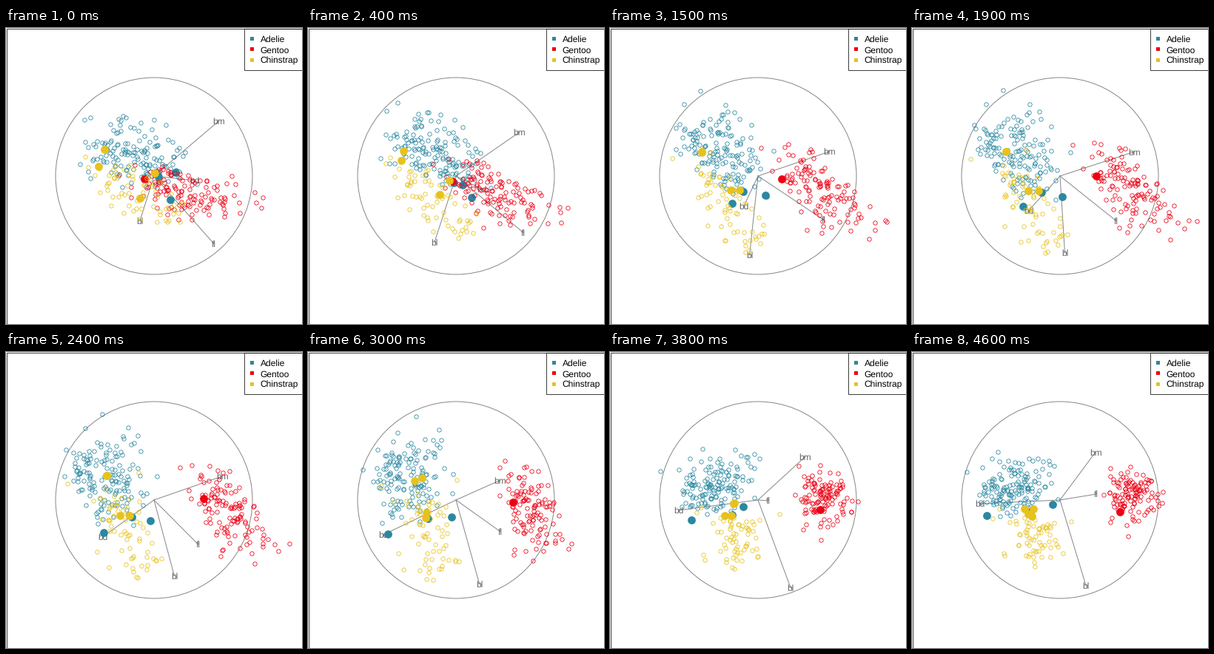
A matplotlib script for the animation above (4.7 s loop, 400 by 400 pixels).

```python
import numpy as np
import matplotlib.pyplot as plt
from matplotlib.animation import FuncAnimation
from matplotlib.patches import Circle, Rectangle

SIZE, FRAMES, STEP = 400, 47, 100
CENTER, RADIUS, SCALE = 200, 133, 222
PT = 0.72  # points per pixel at 100 dpi
GREY = "#888888"
VARS = ["bl", "bd", "fl", "bm"]
MEAN = np.array([43.92, 17.15, 200.9, 4202])
SPAN = np.array([27.5, 8.4, 59, 3600])

# name, colour, count, mean, sd, shared correlation, highlighted birds
SPECIES = [
    ("Adelie", "#2a88a1", 151,
     [38.8, 18.35, 190, 3701], [2.66, 1.22, 6.5, 459], 0.40,
     [[44.1, 18.0, 210, 4000], [45.8, 18.9, 197, 4150],
      [46.0, 21.5, 194, 4200]]),
    ("Gentoo", "#ee0014", 123,
     [47.5, 14.98, 217.2, 5076], [3.08, 0.98, 6.5, 504], 0.68,
     [[48.4, 14.4, 203, 4625]]),
    ("Chinstrap", "#e7c21d", 68,
     [48.8, 18.42, 195.8, 3733], [3.34, 1.13, 7.1, 384], 0.56,
     [[42.4, 17.3, 181, 3600], [40.9, 16.6, 187, 3200],
      [46.0, 18.9, 195, 4150], [43.5, 18.1, 202, 3400]]),
]

# Key poses of the tour: axis tips in pixels from the centre, in VARS order
KEY_T = np.array([0, 8, 15, 24, 30, 38, 46])
KEY_TIPS = np.array([
    [(-19, 61), (55, 6), (81, 92), (88, -75)],
    [(-31, 107), (15, 29), (98, 64), (82, -41)],
    [(-11, 108), (-19, 41), (89, 60), (97, -33)],
    [(28, 104), (-69, 50), (60, 61), (92, -32)],
    [(32, 115), (-98, 47), (60, 43), (60, -27)],
    [(44, 119), (-107, 14), (14, 1), (64, -59)],
    [(35, 116), (-108, 5), (49, -8), (48, -65)],
]) / RADIUS
SLOPES = np.gradient(KEY_TIPS, KEY_T, axis=0)


def basis(i):
    """Orthonormal 4x2 projection, Hermite-smoothed between the key poses."""
    k = min(np.searchsorted(KEY_T, i, side="right") - 1, len(KEY_T) - 2)
    h = KEY_T[k + 1] - KEY_T[k]
    s = (i - KEY_T[k]) / h
    ease = s * s * (3 - 2 * s)
    tips = ((1 - ease) * KEY_TIPS[k] + ease * KEY_TIPS[k + 1]
            + h * s * (1 - s) ** 2 * SLOPES[k]
            - h * s * s * (1 - s) * SLOPES[k + 1])
    u, _, vt = np.linalg.svd(tips, full_matrices=False)
    return u @ vt


def to_pixels(data):
    return (np.asarray(data) - MEAN) / SPAN * SCALE


def flock(rng, n, mean, sd, r):
    """Females and males differ in a common size factor; the rest is noise."""
    sex = np.where(np.arange(n) % 2, 0.8, -0.8)
    size = sex + 0.6 * rng.standard_normal(n)
    z = np.sqrt(r) * size[:, None] + np.sqrt(1 - r) * rng.standard_normal((n, 4))
    z = (z - z.mean(axis=0)) / z.std(axis=0)
    return np.array(mean) + z * sd


plt.rcParams["font.family"] = "Liberation Sans"
plt.rcParams["text.hinting"] = "none"
fig = plt.figure(figsize=(SIZE / 100, SIZE / 100), dpi=100, facecolor="white")
ax = fig.add_axes([0, 0, 1, 1])
ax.set(xlim=(0, SIZE), ylim=(SIZE, 0))
ax.axis("off")


def label(x, y, text, **kw):
    return ax.text(x, y, text, fontsize=12 * PT, va="baseline", **kw)


def box(x, y, w, h, z, **kw):
    ax.add_patch(Rectangle((x, y), w, h, zorder=z, **kw))


def dots(z, **kw):
    return ax.plot([], [], "o", zorder=z, **kw)[0]


ax.add_patch(Circle((CENTER, CENTER), RADIUS, fill=False, ec=GREY, lw=PT))
spokes = [ax.plot([], [], color=GREY, lw=PT, zorder=2)[0] for _ in VARS]
tags = [label(0, 0, v, color="#666666", ha="center", zorder=3) for v in VARS]

frame = dict(ec="black", lw=0.75 * PT)
box(0.5, 0.5, 399, 399, 22, fill=False, **frame)
box(321.5, 0.5, 78, 56, 20, fc="white", **frame)

rng = np.random.default_rng(12)
clouds = []
for k, (name, color, n, mean, sd, r, marked) in enumerate(SPECIES):
    rings = dots(4 + 2 * k, ms=5.4 * PT, mew=0.8 * PT, mec=color, mfc="none")
    discs = dots(5 + 2 * k, ms=10.8 * PT, mew=0, mfc=color)
    birds = flock(rng, n - len(marked), mean, sd, r)
    clouds += [(rings, to_pixels(birds)), (discs, to_pixels(marked))]

    y = 14.7 + 14.4 * k
    box(330, round(y) - 3, 5, 5, 21, fc=color, lw=0)
    label(343.5, y + 4.3, name, color="black", zorder=21)


def update(i):
    proj = basis(i)
    for line, tag, (x, y) in zip(spokes, tags, CENTER + RADIUS * proj):
        line.set_data([CENTER, x], [CENTER, y])
        tag.set_position((x, y + 4.3))
    for art, data in clouds:
        art.set_data(*(CENTER + data @ proj).T)
    return [*spokes, *tags, *(art for art, _ in clouds)]


anim = FuncAnimation(fig, update, frames=FRAMES, interval=STEP, repeat=True,
                     repeat_delay=0, blit=False)
plt.show()
```
